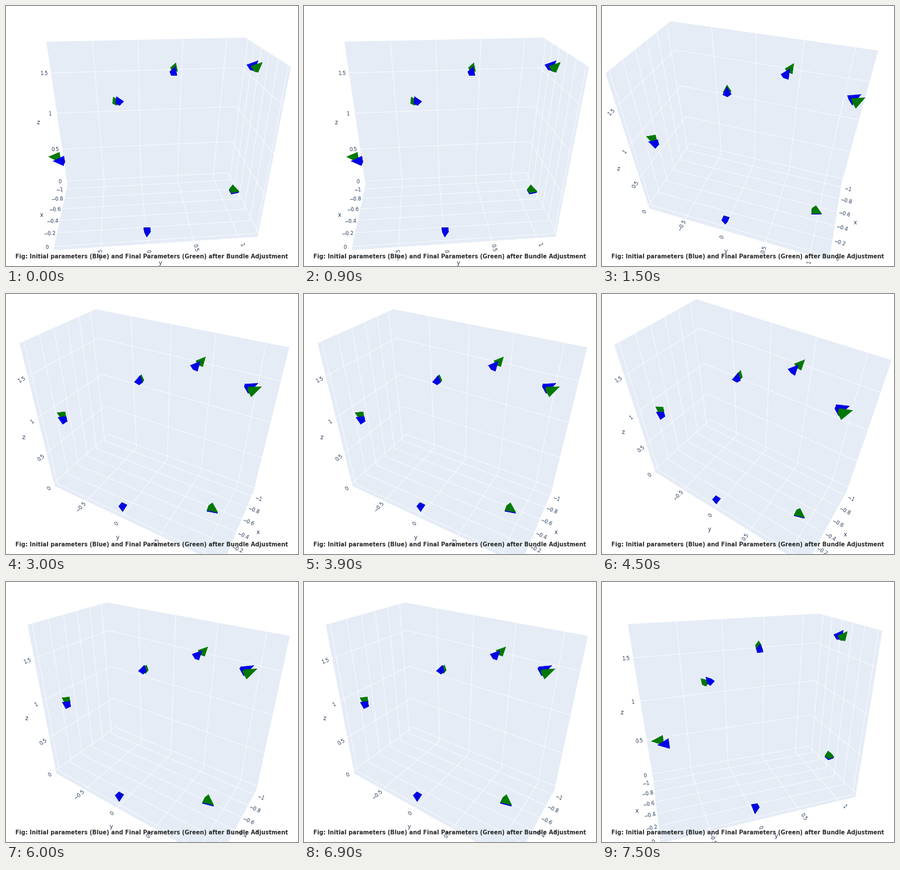
Animation, 499 px wide and 444 px high, one loop 9 s. Source, as a matplotlib script:

```python
import numpy as np
import matplotlib.pyplot as plt
from matplotlib.animation import FuncAnimation
from matplotlib.patches import Polygon

W, H, DPI = 499, 444, 100
WALL, INK = "#e5ecf6", "#2a3f5f"
BLUE, GREEN = "#0000e6", "#007800"
CAPTION = ("Fig: Initial parameters (Blue) and Final Parameters (Green) "
           "after Bundle Adjustment")

TICKS = [np.arange(-1, 0.1, 0.2), np.arange(-0.5, 1.1, 0.5), np.arange(0, 1.6, 0.5)]
LOW, HIGH = np.array([-1.09, -0.99, -0.06]), np.array([0.05, 1.21, 1.85])

# Outline of the box in each view, clockwise or anticlockwise from the
# top front corner of the visible side wall.
OUTLINES = [
    [(487, 104), (409, 54), (69, 61), (105, 305), (81, 417), (430, 394)],
    [(6, 115), (117, 26), (472, 76), (410, 300), (388, 435), (81, 346)],
    [(23, 84), (153, 26), (484, 91), (423, 337), (370, 463), (83, 328)],
    [(21, 87), (161, 9), (495, 113), (419, 335), (348, 464), (91, 304)],
    [(37, 73), (172, 35), (485, 92), (428, 355), (360, 481), (86, 327)],
    [(479, 83), (371, 54), (44, 72), (87, 335), (100, 446), (433, 367)],
]

# Markers: position, shift after adjustment, roll in degrees.
TARGET = np.array([-0.05, 0.05, 0.95])
DEPTH, HALF = 0.1, 0.033
MARKERS = [
    ((0, 0, 0.07), (0, 0, 0), 180),
    ((-0.18, 0.96, 0.41), (0, 0, 0.015), 180),
    ((-0.40, 1.06, 1.73), (0.02, 0.034, -0.01), 90),
    ((-0.91, 0.38, 1.53), (-0.09, 0.02, 0.018), 45),
    ((-0.80, -0.24, 1.25), (-0.096, -0.039, -0.038), 0),
    ((-0.12, -0.81, 0.93), (-0.04, -0.047, 0.023), 0),
]

fig = plt.figure(figsize=(W / DPI, H / DPI), dpi=DPI, facecolor="white")
ax = fig.add_axes([0, 0, 1, 1])


def pt(px):
    return px * 72 / DPI


def unit(v):
    return v / np.linalg.norm(v)


def meet(p, q, r, s):
    """Homogeneous meeting point of the lines pq and rs."""
    return np.cross(np.cross(p, q), np.cross(r, s))


def corner(x, y, z):
    """Box corner; each argument is 0 for the low and 1 for the high side."""
    return LOW + (HIGH - LOW) * (x, y, z)


def solve_camera(outline, side):
    """3x4 projection that fits the box outline and its inner corner."""
    pts = [np.array((x / W, y / W, 1)) for x, y in outline]
    a, b, c, d, e, f = pts
    inner = meet(d, meet(b, c, e, f), b, meet(c, d, a, f))
    pts.append(inner / inner[2])
    far = 1 - side
    solid = [corner(*k) for k in [(1, side, 1), (0, side, 1), (0, far, 1), (0, far, 0),
                                  (1, far, 0), (1, side, 0), (0, side, 0)]]
    rows = []
    for (x, y, _), q in zip(pts, solid):
        h, o = np.append(q, 1), np.zeros(4)
        rows += [[*h, *o, *(-x * h)], [*o, *h, *(-y * h)]]
    cam = np.linalg.svd(np.array(rows))[2][-1].reshape(3, 4)
    cam = np.diag([W, W, 1]) @ cam
    return cam * np.sign(cam[2] @ np.append(solid[0], 1))


def project(cam, points):
    p = np.c_[np.atleast_2d(points), np.ones(np.size(points) // 3)] @ cam.T
    return p[:, :2] / p[:, 2:]


def draw_grid(cam, side):
    """Lines of two axes on each of the three visible walls."""
    for normal, level in enumerate((0, side, 0)):
        for axis in {0, 1, 2} - {normal}:
            run = 3 - normal - axis
            for t in TICKS[axis]:
                ends = np.array([LOW, HIGH])
                ends[:, normal] = (LOW, HIGH)[level][normal]
                ends[:, axis] = t
                assert run != axis
                ax.plot(*project(cam, ends).T, color="white", lw=pt(0.9), alpha=0.85)


def draw_axis(cam, axis, edge, toward):
    """Tick labels and title, set outward along lines from a vanishing point."""
    vanish = cam[:2, toward] / cam[2, toward]

    def place(value, gap):
        q = edge.copy()
        q[axis] = value
        p = project(cam, q)[0]
        out = unit(p - vanish)
        return p + gap * out, np.degrees(np.arctan(-out[1] / out[0]))

    def write(text, pos, size, turn):
        ax.text(*pos, text, size=pt(size), color=INK, family="DejaVu Sans",
                rotation=turn, rotation_mode="anchor", ha="center",
                va="center_baseline")

    for t in TICKS[axis]:
        text = f"{round(t, 1) + 0:g}".replace("-", "\u2212")
        pos, turn = place(t, 12.5)
        write(text, pos, 8.6, turn)
    pos, _ = place((LOW[axis] + HIGH[axis]) / 2, 33.5)
    write("xyz"[axis], pos, 10, 0)


def pyramid(pos, roll):
    """Faces of a view pyramid aimed at the target, one side left open."""
    ahead = unit(TARGET - pos)
    right = unit(np.array([1, 0, 0]) - ahead[0] * ahead)
    down = np.cross(ahead, right)
    apex, centre = pos - 0.75 * DEPTH * ahead, pos + 0.25 * DEPTH * ahead
    turns = np.radians(roll + 45 + 90 * np.arange(4))
    base = [centre + HALF * np.sqrt(2) * (np.cos(t) * right + np.sin(t) * down)
            for t in turns]
    return [base] + [[apex, base[k], base[k + 1]] for k in range(3)]


def draw_markers(cam):
    items = []
    for pos, shift, roll in MARKERS:
        first = np.array(pos, float)
        items += [(first + shift, roll, GREEN), (first, roll, BLUE)]
    items.sort(key=lambda m: -cam[2] @ np.append(m[0], 1))
    for pos, roll, color in items:
        for face in pyramid(pos, roll):
            ax.add_patch(Polygon(project(cam, face), fc=color, ec=color,
                                 lw=0.3, zorder=4))


def draw(i):
    ax.cla()
    ax.set(xlim=(0, W), ylim=(H, 0))
    ax.axis("off")
    outline = OUTLINES[i]
    side = int(outline[0][0] > W / 2)
    cam = solve_camera(outline, side)

    ax.add_patch(Polygon(outline, fc=WALL, ec="none", zorder=0))
    draw_grid(cam, side)
    draw_axis(cam, 0, corner(0, 1 - side, 0), toward=1)
    draw_axis(cam, 1, corner(1, 0, 0), toward=0)
    draw_axis(cam, 2, corner(1 - side, 0, 0), toward=side)
    draw_markers(cam)
    ax.text(W / 2, 430.5, CAPTION, size=pt(9.73), weight="bold", color="#2b2b2b",
            family="DejaVu Sans", ha="center", va="baseline", zorder=6)
    return []


anim = FuncAnimation(fig, draw, frames=len(OUTLINES), init_func=lambda: [],
                     interval=1500, repeat=True, repeat_delay=0)
plt.show()
```
